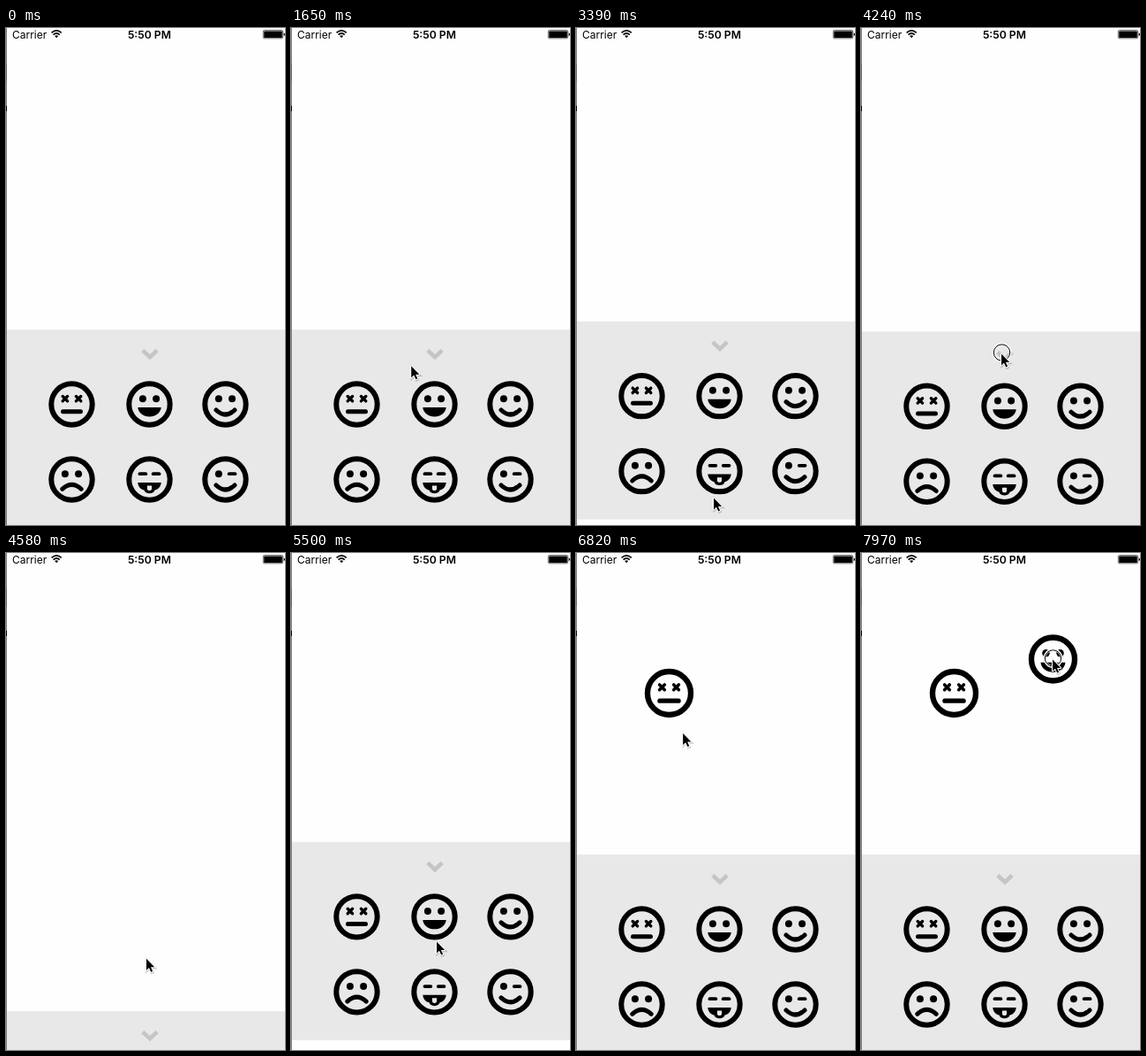
Write an HTML page that moves like this. It is 316 by 562 pixels and loops after 8 s.

```html
<!DOCTYPE html>
<html lang="en">
<head>
<meta charset="utf-8">
<title>Emoji tray</title>
<style>
  html, body { margin: 0; width: 100%; height: 100%; overflow: hidden; background: #fefefe; }
  svg { display: block; width: 100%; height: 100%; }
  text { font-family: Inter, Roboto, Arial, sans-serif; font-size: 12px; fill: #000; }
  .line { fill: none; stroke: #000; stroke-width: 5; stroke-linecap: round; }
</style>
</head>
<body>
<svg viewBox="0 0 316 562">
  <defs>
    <circle id="dot" r="4"/>
    <path id="cross" class="line" d="M-2.7 -2.7L2.7 2.7M2.7 -2.7L-2.7 2.7" style="stroke-width:3.4"/>
    <path id="dash" class="line" d="M-3.4 0H3.4" style="stroke-width:3.8"/>
    <path id="flat" class="line" d="M-10 8.2H10"/>
    <path id="laugh" d="M-13.2 3.6H13.2C12.6 10 7 14 0 14S-12.6 10 -13.2 3.6Z"/>
    <path id="smile" class="line" d="M-10.5 6.5Q0 16.5 10.5 6.5"/>
    <path id="frown" class="line" d="M-10.7 10.8Q0 0.8 10.7 10.8"/>
    <path id="tongue" fill-rule="evenodd" d="M-13.2 3.4H13.2C12.8 8 10 11 6 12C5.4 14.6 3 15.8 0 15.8S-5.4 14.6 -6 12C-10 11 -12.8 8 -13.2 3.4ZM-2.6 7V10A2.6 2.6 0 0 0 2.6 10V7Z"/>
  </defs>

  <rect width="316" height="562" fill="#fefefe"/>

  <g id="tray">
    <rect width="316" height="224" fill="#e8e8e8"/>
    <path d="M154.8 23.5L163 31.2L171.2 23.5" fill="none" stroke="#c5c5c5" stroke-width="4.6"/>
  </g>

  <rect width="1" height="562" fill="#7c7c7c"/>
  <rect y="40" width="1" height="20" fill="#666"/>
  <rect y="88" width="1" height="6"/>

  <text x="7" y="11.7">Carrier</text>
  <g fill="none" stroke="#000" stroke-width="1.7">
    <path d="M51.6 5.3Q57.2 0.3 62.8 5.3M53.6 7.6Q57.2 4.4 60.8 7.6"/>
    <path d="M55.2 9.1Q57.2 7.5 59.2 9.1L57.2 11.2Z" fill="#000" stroke="none"/>
  </g>
  <text x="162.4" y="11.7" text-anchor="middle" font-weight="600" style="font-size:12.2px">5:50 PM</text>
  <rect x="291.3" y="2.6" width="22.4" height="9.2" rx="1.4" fill="#fefefe" stroke="#000" stroke-width=".6"/>
  <rect x="292.2" y="3.4" width="20.6" height="7.6" rx=".6"/>
  <path d="M314.6 5.6Q316 5.8 316 7.3T314.6 9Z"/>

  <g id="dropped"></g>

  <g id="pointer">
    <g id="ring" fill="none">
      <circle cx="1.5" r="9.6" stroke="#fff" stroke-width="2.6"/>
      <circle cx="1.5" r="9.2" stroke="#000"/>
    </g>
    <path id="shade" d="M1 1.5V14.5L4 11.7L6.2 16.6L8.1 15.8L6 11H10.2Z" stroke="#000" stroke-width="2.4" opacity=".2" transform="translate(.6 1)"/>
    <use href="#shade" style="opacity:0"/>
    <path d="M1 1.5V14.5L4 11.7L6.2 16.6L8.1 15.8L6 11H10.2Z" stroke="#fff" stroke-width="2" stroke-linejoin="round" paint-order="stroke"/>
  </g>
</svg>
<script>
const LOOP = 8000, OPEN = 341, SHUT = 518, GROW = 55 / 52;
const $ = id => document.getElementById(id);
const tray = $('tray'), pointer = $('pointer'), ring = $('ring');

// left eye, right eye, mouth
const faces = [
  ['cross', 'cross', 'flat'], ['dot', 'dot', 'laugh'], ['dot', 'dot', 'smile'],
  ['dot', 'dot', 'frown'], ['dash', 'dash', 'tongue'], ['dot', 'dash', 'smile']
];
const columns = [74.5, 162.5, 248.5];

const face = ([left, right, mouth], x = 0, y = 0) => `<g transform="translate(${x} ${y})">
  <circle r="23.2" fill="none" stroke="#000" stroke-width="6"/>
  <use href="#${left}" x="-7.6" y="-6.3"/><use href="#${right}" x="7.6" y="-6.3"/>
  <use href="#${mouth}"/></g>`;

tray.innerHTML += faces.map((f, i) => face(f, columns[i % 3], i < 3 ? 84.5 : 169.5)).join('');
$('dropped').innerHTML = `<g>${face(faces[0])}</g><g>${face(faces[1])}</g>`;
const [first, second] = $('dropped').children;

// Tray swipes: press, release, resting place
const swipes = [[1880, 2245, SHUT], [2700, 3040, OPEN], [4230, 4280, SHUT], [5205, 5260, OPEN]];
// Face drags: press, release
const drags = [[6190, 6690], [7390, LOOP]];

// Pointer stops: time, x, y, pause
const path = [
  [1020, 312, 428], [1480, 112, 402], [1820, 158, 366, 600], [2520, 157, 367],
  [2680, 157, 543, 60], [3390, 155, 530], [4010, 158, 367, 230], [4580, 158, 457],
  [4980, 160, 544, 230], [5500, 164, 438], [6010, 70, 432, 180], [6690, 101, 165],
  [6820, 120, 202], [6990, 156, 397, 60], [7160, 157, 424, 230], [7970, 216, 119, 30]
].flatMap(([t, x, y, pause]) => pause ? [[t, x, y], [t + pause, x, y]] : [[t, x, y]]);

const slope = (i, k) => {
  const a = path[i], b = path[i + 1];
  return a && b ? (b[k] - a[k]) / (b[0] - a[0]) : 0;
};
const tangent = (i, k) => {
  const p = slope(i - 1, k), q = slope(i, k);
  return p * q > 0 ? 2 * p * q / (p + q) : 0;
};

// Monotone cubic through the stops
function at(t, k) {
  if (t <= path[0][0]) return path[0][k];
  let i = 0;
  while (i < path.length - 2 && t >= path[i + 1][0]) i++;
  const a = path[i], b = path[i + 1], h = b[0] - a[0], u = (t - a[0]) / h, v = 1 - u;
  return a[k] * (1 + 2 * u) * v * v + b[k] * u * u * (3 - 2 * u)
    + h * u * v * (tangent(i, k) * v - tangent(i + 1, k) * u);
}

// Share of the way still to go after a release
function slide(ms) {
  const u = Math.min(1, ms / 300);
  return 1 - u * u * (3 - 2 * u);
}
function spring(ms) {
  const a = Math.PI * ms / 270;
  return Math.exp(-0.75 * a) * (Math.cos(a) + 0.75 * Math.sin(a));
}

function trayTop(t) {
  let top = OPEN;
  for (const [press, release, rest] of swipes) {
    if (t < press) break;
    top += Math.sign(rest - top) * 10 * Math.min(1, (t - press) / (release - press));
    if (t >= release) top = rest + (top - rest) * (rest === OPEN ? spring : slide)(t - release);
  }
  return top;
}

const show = (el, on) => el.setAttribute('visibility', on ? 'inherit' : 'hidden');
const move = (el, x, y, extra = '') => el.setAttribute('transform', `translate(${x} ${y})${extra}`);

function placeFace(el, t, [press, release], dx, dy) {
  const s = Math.min(t, release);
  show(el, t > press + 40);
  move(el, at(s, 1) + dx, at(s, 2) + dy, ` scale(${GROW})`);
}

function draw(t) {
  move(tray, 0, trayTop(t));
  placeFace(first, t, drags[0], 4.5, -6.5);
  placeFace(second, t, drags[1], 1.5, 1);
  show(pointer, t >= 1020);
  show(ring, [...swipes, ...drags].some(([press, release]) => t >= press && t < release));
  move(pointer, at(t, 1), at(t, 2));
}

function tick() {
  draw(performance.now() % LOOP);
  requestAnimationFrame(tick);
}
tick();
</script>
</body>
</html>
```
